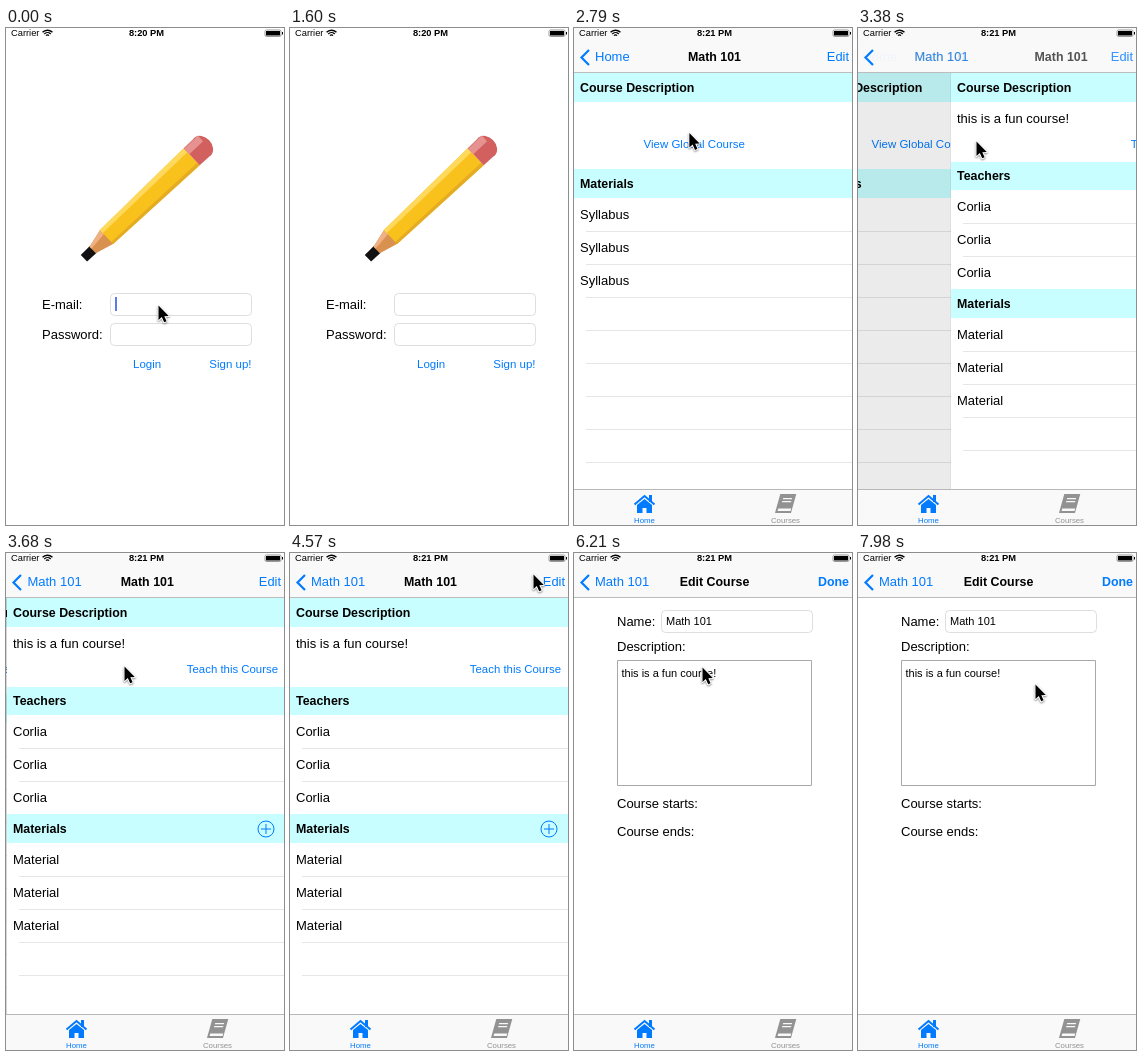
An HTML page with a canvas that plays this animation: 278x497 px, repeating every 8 s.

```html
<!DOCTYPE html>
<html lang="en">
<head>
<meta charset="utf-8">
<title>Course app walkthrough</title>
<style>
html, body { margin: 0; width: 100%; height: 100%; overflow: hidden; background: #fff; }
canvas { display: block; width: 278px; height: 497px; }
</style>
</head>
<body>
<canvas id="stage"></canvas>
<script>
const W = 278, H = 497, LOOP = 8000;
const BLUE = '#007aff', CYAN = '#c8feff', GREY = '#929292', BAR = '#f9f9f9';
const NAV_BOTTOM = 45, TAB_TOP = 461, ROW = 33;
const canvas = document.getElementById('stage');
const ctx = canvas.getContext('2d');
const ratio = window.devicePixelRatio || 1;
canvas.width = W * ratio;
canvas.height = H * ratio;

// ---- helpers ----
function text(str, x, y, { size = 13, color = '#000', bold = false, align = 'left', alpha = 1 } = {}) {
  ctx.font = `${bold ? 'bold ' : ''}${size}px "Liberation Sans", Arial, sans-serif`;
  ctx.textAlign = align;
  ctx.textBaseline = 'middle';
  ctx.fillStyle = color;
  ctx.globalAlpha = alpha;
  ctx.fillText(str, x, y);
  ctx.globalAlpha = 1;
}

function rect(x, y, w, h, color) {
  ctx.fillStyle = color;
  ctx.fillRect(x, y, w, h);
}

function trace(points) {
  ctx.beginPath();
  for (let i = 0; i < points.length; i += 2) ctx.lineTo(points[i], points[i + 1]);
}

function poly(color, ...points) {
  trace(points);
  ctx.fillStyle = color;
  ctx.fill();
}

function line(color, width, ...points) {
  trace(points);
  ctx.strokeStyle = color;
  ctx.lineWidth = width;
  ctx.stroke();
}

function arc(color, width, x, y, r, from = 0, to = 2 * Math.PI) {
  ctx.beginPath();
  ctx.arc(x, y, r, from, to);
  ctx.strokeStyle = color;
  ctx.lineWidth = width;
  ctx.stroke();
}

function field(x, y, w, h, radius = 4, color = '#dedede') {
  ctx.beginPath();
  ctx.roundRect(x + .5, y + .5, w - 1, h - 1, radius);
  ctx.strokeStyle = color;
  ctx.lineWidth = 1;
  ctx.stroke();
}

function placed(x, y, draw) {
  ctx.save();
  ctx.translate(x, y);
  draw();
  ctx.restore();
}

function section(label, y, h = 29) {
  rect(0, y, W, h, CYAN);
  text(label, 6, y + h / 2 + 1, { size: 12.4, bold: true });
}

// Labels on a fixed row pitch, with a hairline under each of the first `lines` rows.
function list(labels, top, lines, inset = 12, color = '#e6e6e6') {
  labels.forEach((label, i) => text(label, 6, top + ROW * i + 17));
  for (let i = 1; i <= lines; i++) rect(inset, top + ROW * i, W, 1, color);
}

// ---- login ----
// Drawn along the pencil's axis: u runs from wood to eraser, v across in half widths.
function pencil() {
  const half = u => u > 0 ? 9.7 + u * .017 : Math.max(4.6, 9.7 + u * .27);
  const band = (color, from, to, v0 = -1, v1 = 1) => poly(color,
    from, v0 * half(from), to, v0 * half(to), to, v1 * half(to), from, v1 * half(from));
  placed(100.5, 209, () => {
    ctx.rotate(-.755);
    band('#111', -31, -18);
    band('#d9914f', -19, 1);
    band('#efb083', -19, 1, -1, -.4);
    band('#f9c11c', 0, 117);
    band('#ffd95c', 0, 117, -1, -.55);
    band('#e4ab24', 0, 117, .7, 1);
    ctx.beginPath();
    ctx.ellipse(132, 0, 9, 12, 0, 0, 7);
    ctx.fillStyle = '#d2605f';
    ctx.fill();
    band('#d2605f', 117, 133);
    band('#e59291', 117, 136, -.95, -.3);
  });
}

function login(caretOn) {
  rect(0, 0, W, H, '#fff');
  pencil();
  text('E-mail:', 36, 277);
  text('Password:', 36, 307);
  field(104, 265, 142, 23);
  field(104, 295, 142, 23);
  text('Login', 127, 337, { size: 11.5, color: BLUE });
  text('Sign up!', 245.5, 337, { size: 11.5, color: BLUE, align: 'right' });
  if (caretOn) rect(109, 269, 2, 14, '#5a7be8');
}

// ---- navigation screens ----
const screens = [
  { title: 'Home', back: 'Logout', right: '', draw() {
    text('Your Courses', 5, 63);
    rect(0, 70, W, 1, '#222');
    list(['Math 101'], 78, 11, 0, '#dadada');
  } },
  { title: 'Math 101', back: 'Home', right: 'Edit', draw() {
    section('Course Description', NAV_BOTTOM);
    text('View Global Course', 69.5, 117, { size: 11.5, color: BLUE });
    section('Materials', 141);
    list(Array(3).fill('Syllabus'), 170, 8);
  } },
  { title: 'Math 101', back: 'Math 101', right: 'Edit', draw() {
    section('Course Description', NAV_BOTTOM);
    text('this is a fun course!', 6, 91);
    text('Teach this Course', 271, 117, { size: 11.4, color: BLUE, align: 'right' });
    section('Teachers', 134, 28);
    list(Array(3).fill('Corlia'), 162, 2);
    section('Materials', 261);
    arc(BLUE, 1, 259, 276, 8);
    line(BLUE, 1, 254, 276, 264, 276);
    line(BLUE, 1, 259, 271, 259, 281);
    list(Array(3).fill('Material'), 290, 4);
  } },
  { title: 'Edit Course', back: 'Math 101', right: 'Done', rightBold: true, draw() {
    text('Name:', 43, 69);
    field(87, 57, 152, 23);
    text('Math 101', 92, 69, { size: 11 });
    text('Description:', 43, 94);
    field(43, 107, 195, 126, 0, '#a8a8a8');
    text('this is a fun course!', 47.5, 121, { size: 11 });
    text('Course starts:', 43, 251);
    text('Course ends:', 43, 279.5);
  } }
];

function page(screen, x, dim = 0) {
  placed(x, 0, () => {
    rect(0, NAV_BOTTOM, W, TAB_TOP - NAV_BOTTOM, '#fff');
    screen.draw();
    rect(0, NAV_BOTTOM, W, TAB_TOP - NAV_BOTTOM, `rgba(0,0,0,${dim})`);
  });
}

function statusBar(clock) {
  text('Carrier', 5, 5.5, { size: 9.3 });
  for (let r = 2; r < 8; r += 2.4) arc('#000', 1.4, 41.5, 9, r, -Math.PI * .76, -Math.PI * .24);
  text(clock, 140.5, 5.5, { size: 9.3, bold: true, align: 'center' });
  field(258.5, 1.5, 17, 7.5, 1.5, '#999');
  rect(260, 3, 14, 4.5, '#000');
  rect(276, 4, 1, 2.5, '#000');
}

function navBar(index, p) {
  const now = screens[index], before = screens[index - 1];
  const rest = 1 - p, y = 29.5;
  const title = { size: 12.4, bold: true };
  const right = (screen, alpha) => text(screen.right, 275, y,
    { size: screen.rightBold ? 12.4 : 12.9, bold: screen.rightBold, color: BLUE, align: 'right', alpha });

  rect(0, 0, W, NAV_BOTTOM, BAR);
  rect(0, NAV_BOTTOM - 1, W, 1, '#bcbcbc');
  if (index) {
    ctx.globalAlpha = index === 1 ? p ** 8 : 1;
    line(BLUE, 2.2, 15, 22, 7.5, 29.5, 15, 37);
    ctx.globalAlpha = 1;
  }
  const backX = index ? 21 + rest * 106 : 8;
  text(now.back, backX, y, { color: BLUE, alpha: .4 + .6 * p });
  text(now.title, 140.5 + 187 * rest, y, { ...title, align: 'center', alpha: p });
  right(now, p);
  if (p < 1) {
    text(before.title, backX, y, { ...title, alpha: rest ** 2 });
    text(before.back, 21 - 25 * p, y, { color: BLUE, alpha: rest ** 3 });
    right(before, rest);
  }
}

function houseIcon() {
  rect(4.5, -9, 3, 7, BLUE);
  line(BLUE, 2, -10, .5, 0, -8, 10, .5);
  poly(BLUE, -7.5, 1, 0, -5, 7.5, 1, 7.5, 9, -7.5, 9);
  rect(-2, 4, 4, 5, BAR);
}

function bookIcon() {
  ctx.transform(1, 0, -.28, 1, 0, 0);
  rect(-8, -10, 16, 19, GREY);
  rect(-6, 4.5, 13, 2.5, BAR);
  for (let y = -6; y < 0; y += 3) rect(-4, y, 9, 1.2, BAR);
}

function tabBar() {
  rect(0, TAB_TOP, W, H - TAB_TOP, BAR);
  rect(0, TAB_TOP, W, 1, '#b8b8b8');
  placed(70.5, 476, houseIcon);
  placed(211.5, 476, bookIcon);
  text('Home', 70.5, 493, { size: 7.8, color: BLUE, align: 'center' });
  text('Courses', 211.5, 493, { size: 7.8, color: GREY, align: 'center' });
}

// ---- motion ----
const HOME_AT = 2040;
const pushes = [2161, 3251, 5490];

// Pointer glides: start, duration, destination
const glides = [
  [740, 440, 195, 510],
  [1328, 122, 191, 454],
  [1450, 148, 191, 510],
  [HOME_AT - 5, 5, 109, 89],
  [2340, 740, 118, 113],
  [3980, 584, 243, 21],
  [4564, 296, 257, 31],
  [5610, 586, 128, 114],
  [6495, 593, 49, 30],
  [7235, 444, 127, 114],
  [7679, 297, 177, 131]
];

function pointer(t) {
  let x = 152, y = 277;
  for (const [start, duration, toX, toY] of glides) {
    const k = Math.min(1, Math.max(0, (t - start) / duration));
    const eased = k * k * (3 - 2 * k);
    x += (toX - x) * eased;
    y += (toY - y) * eased;
  }
  placed(x, y, () => {
    const arrow = [.5, .5, .5, 15, 3.8, 12, 6.2, 17.3, 8.6, 16.2, 6.3, 11.2, 10.8, 11, .5, .5];
    ctx.lineJoin = 'round';
    ctx.shadowColor = 'rgba(0,0,0,.45)';
    ctx.shadowBlur = 2 * ratio;
    ctx.shadowOffsetY = ratio;
    line('#fff', 2, ...arrow);
    ctx.shadowColor = 'transparent';
    poly('#000', ...arrow);
  });
}

// Critically damped push
function spring(ms) {
  const s = ms * .018;
  const p = 1 - (1 + s) * Math.exp(-s);
  return p > .998 ? 1 : p;
}

function tick(t) {
  const [start, step] = t < 1450 ? [0, 147.5] : [1450, 148.3];
  return start + Math.floor((t - start) / step) * step;
}

function render(t) {
  ctx.setTransform(ratio, 0, 0, ratio, 0, 0);
  if (t < HOME_AT) {
    login(t < 147 || (t >= 590 && t < 1030));
    statusBar('8:20 PM');
  } else {
    const index = pushes.filter(start => start <= t).length;
    const p = index ? spring(t - pushes[index - 1]) : 1;
    const x = Math.round(W * (1 - p));
    if (p < 1) {
      page(screens[index - 1], Math.round(-.3 * W * p), .12 * p);
      rect(x - 1, NAV_BOTTOM, 1, TAB_TOP - NAV_BOTTOM, 'rgba(0,0,0,.05)');
    }
    page(screens[index], x);
    navBar(index, p);
    tabBar();
    statusBar('8:21 PM');
  }
  pointer(t);
}

function frame(now) {
  render(tick(now % LOOP));
  requestAnimationFrame(frame);
}
render(0);
requestAnimationFrame(frame);
</script>
</body>
</html>
```
